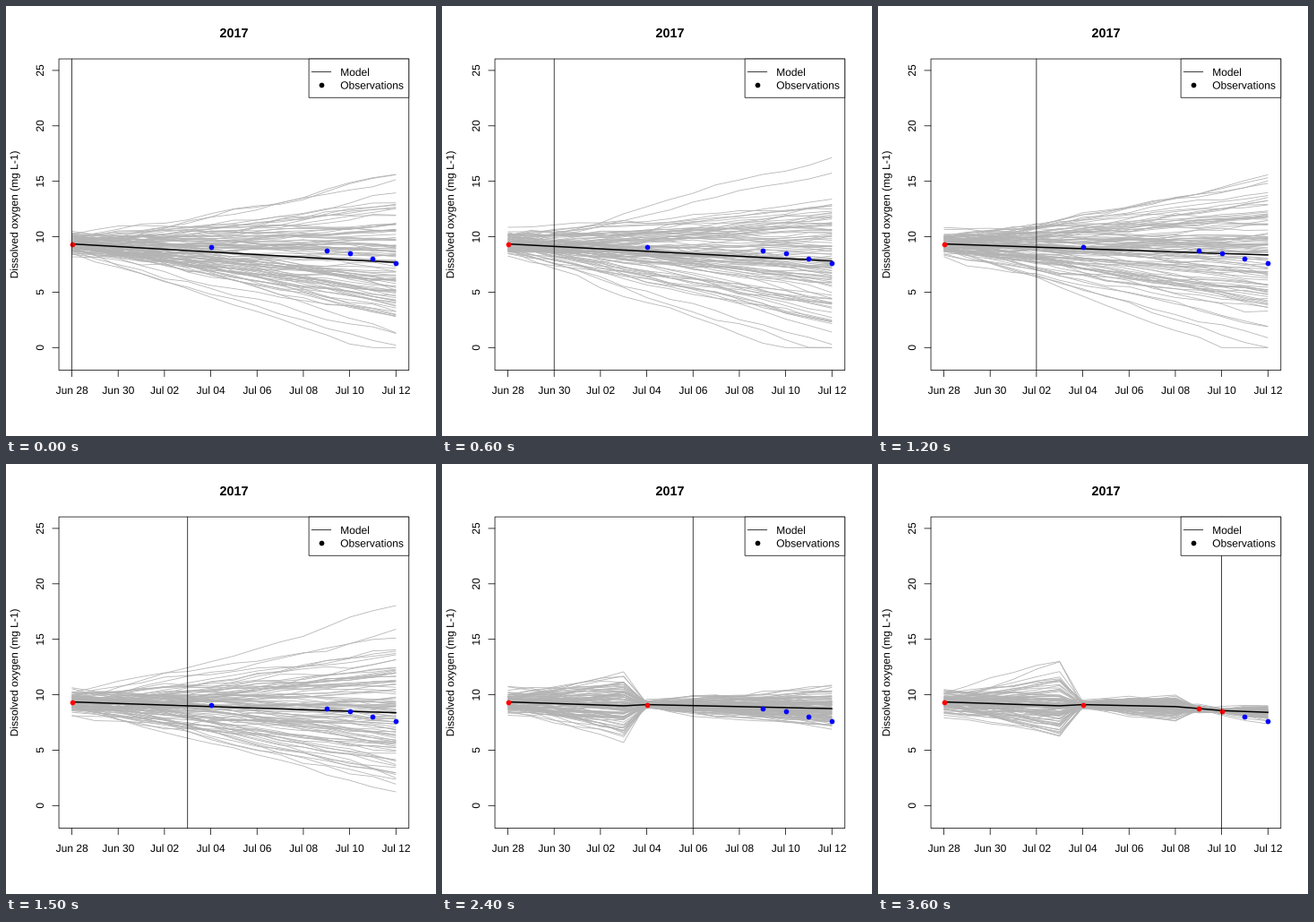
Animation of 480 by 480 pixels, one loop 3900 ms. Source, as a matplotlib script:

```python
import numpy as np
import matplotlib.pyplot as plt
from matplotlib.animation import FuncAnimation
from matplotlib.collections import LineCollection
from matplotlib.patches import PathPatch, Rectangle
from matplotlib.textpath import TextPath
from matplotlib.transforms import Affine2D

SIZE, DPI = 480, 72
LEFT, RIGHT, TOP, BOTTOM = 59.04, 449.76, 59.04, 406.56
DAYS = np.arange(15)
ISSUES = 13
MEMBERS = 100
OBS = {0: 9.28, 6: 9.11, 11: 8.75, 12: 8.51, 13: 8.02, 14: 7.66}
OBS_SD, START_SD, SLOPE_SD, NOISE_SD = 0.15, 0.5, 0.24, 0.16


def X(day):
    return 73.51 + 25.842 * np.asarray(day)


def Y(value):
    return 381.31 - 12.376 * np.asarray(value)


def simulate(issue):
    """Ensemble Kalman filter that knows the observations up to the issue day."""
    rng = np.random.default_rng(40 + issue)

    def normal(sd):
        z = rng.normal(size=MEMBERS)
        return sd * (z - z.mean()) / z.std()

    drift = -0.07 - 0.05 * np.exp(-(issue / 3) ** 4)
    slope = drift + normal(SLOPE_SD)
    state = 9.35 + normal(START_SD)
    paths = [state]
    for day in DAYS[1:]:
        state = state + slope + normal(NOISE_SD)
        if day <= issue and day in OBS:
            cov = np.cov(state, slope)
            miss = OBS[day] + normal(OBS_SD) - state
            gain = cov[0] / (cov[0, 0] + OBS_SD ** 2)
            state = state + gain[0] * miss
            slope = slope + gain[1] * miss
        paths.append(state)
    return np.clip(np.array(paths).T, 0, None)


fig = plt.figure(figsize=(SIZE / DPI, SIZE / DPI), dpi=DPI, facecolor="white")
ax = fig.add_axes([0, 0, 1, 1])
ax.set(xlim=(0, SIZE), ylim=(SIZE, 0))
ax.axis("off")


def line(x, y, z=4, width=0.75):
    return ax.plot(x, y, color="black", lw=width, zorder=z, snap=False,
                   solid_capstyle="round")[0]


def label(x, y, s, size=12, weight="normal", angle=0, centred=True):
    """Text as outlines, with its baseline through (x, y)."""
    path = TextPath((0, 0), s, size=size,
                    prop={"family": "Liberation Sans", "weight": weight})
    box = path.get_extents()
    shift = -(box.x0 + box.x1) / 2 if centred else 0
    place = Affine2D().translate(shift, 0).scale(1, -1).rotate_deg(-angle).translate(x, y)
    ax.add_patch(PathPatch(place.transform_path(path), fc="black", lw=0,
                           zorder=8, snap=False))


def frame_box(x, y, w, h, fill, z):
    ax.add_patch(Rectangle((x, y), w, h, fc=fill, ec="black", lw=0.75,
                           zorder=z, snap=False))


def dot(x, y, z, color="black"):
    return ax.scatter([x], [y], s=5.7 ** 2, c=color, lw=0, zorder=z, snap=False)


frame_box(LEFT, TOP, RIGHT - LEFT, BOTTOM - TOP, "none", 5)
for day in range(0, 15, 2):
    line([X(day)] * 2, [BOTTOM, BOTTOM + 7.2])
    label(X(day), 433, f"Jun {28 + day}" if day < 3 else f"Jul {day - 2:02d}")
for value in range(0, 26, 5):
    line([LEFT - 7.2, LEFT], [Y(value)] * 2)
    label(42, Y(value), str(value), angle=90)
label(254.4, 35, "2017", size=14.4, weight="bold")
label(13.2, 232.8, "Dissolved oxygen (mg L-1)", angle=90)

frame_box(338.1, TOP, RIGHT - 338.1, 43.2, "white", 6)
line([341.2, 362.8], [73.44] * 2, z=7)
dot(352, 87.84, 7)
label(373.2, 78, "Model", centred=False)
label(373.2, 92.6, "Observations", centred=False)

members = LineCollection([], colors="#b3b3b3", linewidths=0.8, zorder=1)
ax.add_collection(members, autolim=False)
mean_line = line([], [], z=2, width=1.5)
today = line([], [])
dots = {day: dot(X(day), Y(value), 3) for day, value in OBS.items()}
runs = [simulate(k) for k in range(ISSUES)]


def update(k):
    paths = runs[k]
    members.set_segments([np.column_stack([X(DAYS), Y(p)]) for p in paths])
    mean_line.set_data(X(DAYS), Y(paths.mean(axis=0)))
    today.set_data([X(k)] * 2, [TOP, BOTTOM])
    for day, mark in dots.items():
        mark.set_facecolor("red" if day <= k else "blue")
    return [members, mean_line, today, *dots.values()]


anim = FuncAnimation(fig, update, frames=ISSUES, interval=300,
                     repeat=True, repeat_delay=0)
plt.show()
```
